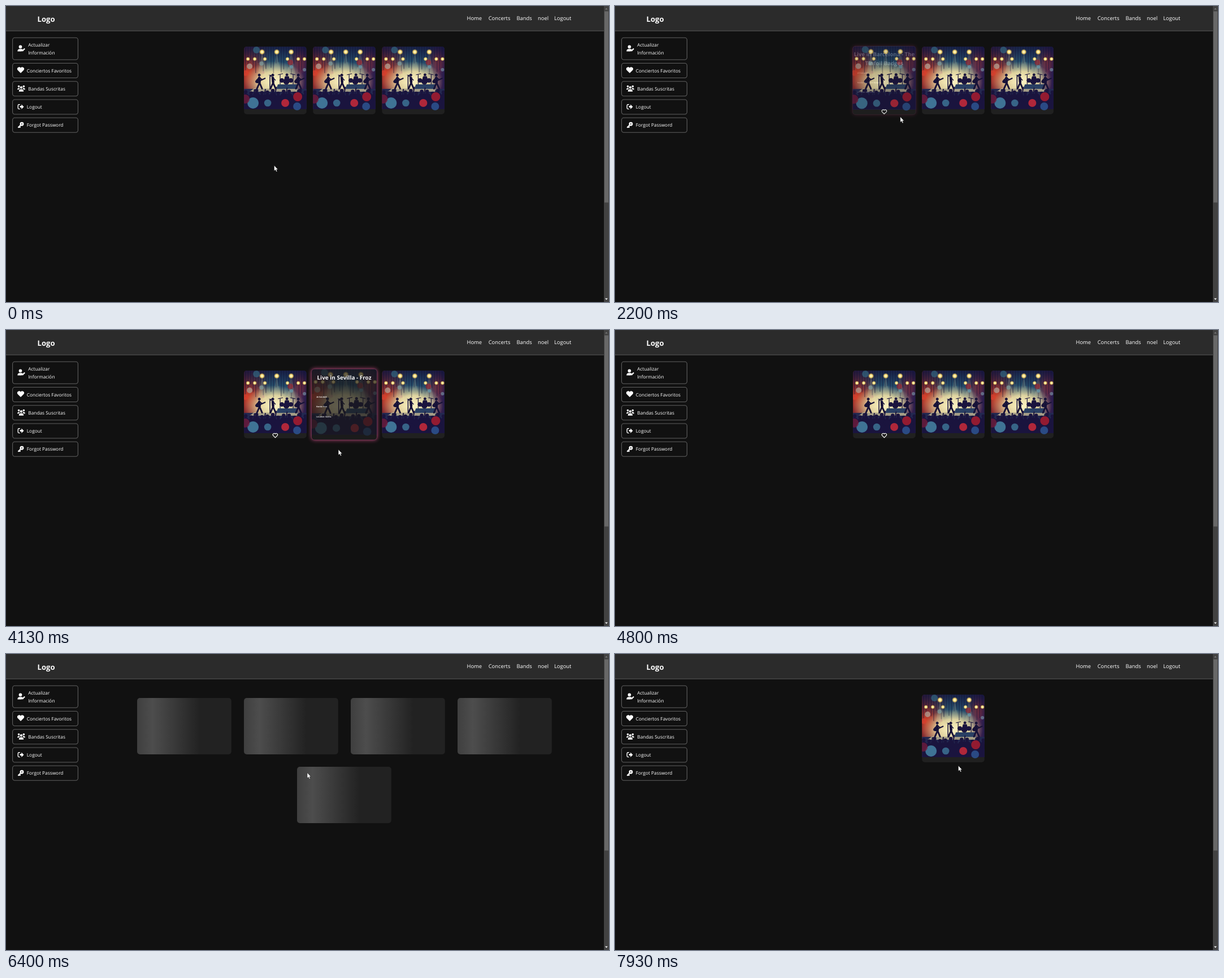
An HTML page that plays this animation: 1067 px wide and 525 px high, repeating every 8 s.

```html
<!DOCTYPE html>
<html lang="es">
<head>
<meta charset="utf-8">
<title>Concerts</title>
<style>
html, body { margin: 0; width: 100%; height: 100%; overflow: hidden; background: #111; }
svg { display: block; width: 1067px; height: 525px; fill: #fff; text-rendering: geometricPrecision;
  font-family: "Open Sans", "Noto Sans", sans-serif; }
.line { fill: none; stroke: #fff; }
.nav { font-size: 9.4px; font-weight: 500; }
.side { font-size: 8.32px; font-weight: 500; }
.title { font: bold 9.5px "Open Sans", sans-serif; text-anchor: middle; }
.info { font: bold 3.1px "Open Sans", sans-serif; }
</style>
</head>
<body>
<svg viewBox="0 0 1067 525">
  <defs>
    <filter id="blur" x="-20%" y="-20%" width="140%" height="140%"><feGaussianBlur stdDeviation="3.6"/></filter>
    <filter id="soft"><feGaussianBlur stdDeviation=".6"/></filter>
    <clipPath id="cardClip"><rect x="-55.3" y="-60" width="110.6" height="120" rx="5"/></clipPath>
    <linearGradient id="shine">
      <stop stop-color="#222"/><stop offset=".5" stop-color="#4d4d4d"/><stop offset="1" stop-color="#222"/>
    </linearGradient>
    <linearGradient id="sky">
      <stop stop-color="#6e2430"/><stop offset=".22" stop-color="#6a4a50"/><stop offset=".42" stop-color="#2f6a80"/>
      <stop offset=".7" stop-color="#285a78"/><stop offset=".9" stop-color="#4a2850"/><stop offset="1" stop-color="#241a4c"/>
    </linearGradient>
    <linearGradient id="shade" x2="0" y2="1">
      <stop stop-color="#14153c" stop-opacity=".85"/><stop offset=".5" stop-color="#14153c" stop-opacity="0"/>
    </linearGradient>
    <radialGradient id="glow">
      <stop stop-color="#fff6c8"/><stop offset=".5" stop-color="#f8e3a4" stop-opacity=".85"/>
      <stop offset="1" stop-color="#e0bc84" stop-opacity="0"/>
    </radialGradient>
    <radialGradient id="fire">
      <stop stop-color="#cc4028"/><stop offset="1" stop-color="#c03428" stop-opacity="0"/>
    </radialGradient>
    <radialGradient id="lamp">
      <stop stop-color="#fffbe0"/><stop offset=".5" stop-color="#ffe27a"/><stop offset="1" stop-color="#ffc94a" stop-opacity="0"/>
    </radialGradient>
    <g id="player" fill="#171238" stroke="#171238" stroke-linecap="round">
      <circle cy="-10.5" r="2"/>
      <path fill="none" stroke-width="4.6" d="M0-5.5L.5 2"/>
      <path fill="none" stroke-width="3" d="M.5 3L-4 13.5M.5 3L5 13.5"/>
    </g>
    <g id="guitarist">
      <use href="#player"/>
      <path d="M-2 1L11-5M0-6L-5-1M0-6L6-2" stroke="#171238" stroke-width="2"/>
      <ellipse cx="-2.5" cy="1" rx="4.6" ry="3" fill="#171238"/>
    </g>
    <g id="photo"></g>
    <path id="heart" d="M0 4.8L-4.6.2A2.8 2.8 0 0 1 0-3.4A2.8 2.8 0 0 1 4.6.2Z"/>
  </defs>

  <rect width="1067" height="525" fill="#111"/>
  <rect width="1058" height="44" fill="#2b2b2b"/>
  <rect y="43.6" width="1058" height="1.1" fill="#555"/>
  <text x="55.5" y="28" font-size="13.1" font-weight="bold">Logo</text>
  <g class="nav" id="userNav"></g>
  <g class="nav" id="guestNav"></g>
  <g class="side" id="side"></g>
  <g id="icons">
    <circle cx="25.5" cy="72.4" r="2.8"/>
    <path d="M20.4 80.5Q20.4 76.3 24.5 76.3H27Q29 76.3 30 77.3L27.8 80.5Z"/>
    <path class="line" stroke-width="2.1" d="M28.8 80L33.2 75.6"/>
    <use href="#heart" transform="translate(26 113.6) scale(1.15)"/>
    <circle cx="27" cy="144.4" r="2.2"/><circle cx="22.6" cy="142.6" r="1.8"/><circle cx="31.4" cy="142.6" r="1.8"/>
    <path d="M22.8 151.8Q22.8 147.6 27 147.6T31.2 151.8ZM20 148.3Q20 145.2 24 145.2V147L22.8 148.3ZM34 148.3Q34 145.2 30 145.2V147L31.2 148.3Z"/>
    <path class="line" stroke-width="1.4" d="M24.8 174.8H23Q21.3 174.8 21.3 176.4V181Q21.3 182.6 23 182.6H24.8"/>
    <path d="M24.6 177.3H27.3V174.4L31.6 178.7L27.3 183V180.1H24.6Z"/>
    <circle class="line" cx="28" cy="209.2" r="2.2" stroke-width="2.5"/>
    <path class="line" stroke-width="2.2" d="M26.4 210.8L21.4 215.8M22 214.8H24.6V213"/>
  </g>

  <g id="empty">
    <path d="M427 71L443.5 87M443.5 71L427 87" stroke="#f92f60" stroke-width="5" stroke-linecap="round"/>
    <text x="456" y="87" font-size="20.96" fill="#d81616">No hay conciertos programados.</text>
  </g>
  <g id="skeletons" fill="url(#shine)"></g>
  <g id="cards"></g>

  <rect x="1058" width="9" height="525" fill="#424242"/>
  <rect x="1059" y="9.5" width="7" height="339" fill="#686868"/>
  <path d="M1060 6.2L1062.4 3.6L1064.8 6.2Z" fill="#777"/>
  <path d="M1060 518.6L1062.4 521.2L1064.8 518.6Z"/>

  <g id="cursor" stroke="#111" stroke-width=".5">
    <path id="arrow" d="M-.5-.5V9.3L1.7 7.3L3.3 10.7L4.9 10L3.4 6.7H6.2Z"/>
    <path id="hand" d="M-1 1.2Q-1 0 0 0T1 1.2V4.6L4.6 5.6Q5.6 6 5.5 8L4.6 12.5H-.6L-3.6 8.6Q-4.2 7-2.6 7L-1 8.2Z"/>
  </g>
</svg>

<script>
const $ = id => document.getElementById(id);
const show = (id, on) => $(id).style.display = on ? "" : "none";
const text = (x, y, s, cls = "") => `<text x="${x}" y="${y}" class="${cls}">${s}</text>`;
const dot = (x, y, r, fill, alpha = 1) =>
  `<circle cx="${x}" cy="${y}" r="${r}" fill="${fill}" opacity="${alpha}"/>`;

// Concert picture, 110.6 units square
function photo() {
  const ink = "#1a143e";
  let s = `<rect width="110.6" height="110.6" fill="url(#sky)"/>
    <ellipse cx="8" cy="46" rx="28" ry="40" fill="url(#fire)"/>
    <ellipse cx="98" cy="24" rx="18" ry="26" fill="url(#fire)" opacity=".55"/>
    <rect width="110.6" height="80" fill="url(#shade)"/>
    <ellipse cx="54" cy="62" rx="54" ry="36" fill="url(#glow)"/>`;
  for (let x = 2; x < 110; x += 4.5)
    s += `<rect x="${x}" width="1.6" height="${36 + 12 * Math.sin(x)}" fill="#121338" opacity=".4"/>`;
  for (const x of [32, 58, 83.5])
    s += `<path d="M${x} 10L${x - 11} 66H${x + 11}Z" fill="#fff0b0" opacity=".14"/>` + dot(x, 9.5, 5.2, "url(#lamp)");
  for (const x of [7, 19, 37, 77, 96, 107]) s += dot(x, 22, 3.8, "url(#lamp)");
  s += dot(10, 35, 5, "#b5a294", .75) + dot(31, 30, 3.8, "#7fa0a0", .7) + dot(3, 47, 5, "#d8402f", .8)
    + dot(22, 6, 6, "#34748c", .6) + dot(84, 36, 3, "#6a9eb0", .7) + dot(82, 28, 5, "#a8242c", .6)
    + dot(107, 41, 3, "#7a9cae", .6) + dot(34, 46, 2.5, "#d8b094", .7);
  // stage and band
  s += `<path d="M0 75H111V111H0Z" fill="#232850"/><path d="M18 74H94L102 80H10Z" fill="#cfc598" opacity=".75"/>
    <path d="M60 67H95V75H57Z" fill="#2a4064"/>
    <use href="#guitarist" x="27" y="61"/><use href="#guitarist" x="96" y="61"/><use href="#player" x="51" y="61"/>
    <path d="M51 55L46 51L50 51M51 55L56 60M46 52V76" stroke="${ink}" fill="none" stroke-width="1.6"/>
    <g fill="${ink}" stroke="${ink}"><circle cx="76" cy="50" r="2"/><path d="M73 53H79L81 61H71Z"/>
    <circle cx="75" cy="62" r="5"/><circle cx="67" cy="60" r="3.6"/><circle cx="83" cy="60" r="3.6"/>
    <path d="M60 50L69 48M82 48L91 50M64 49V67M87 49V67" stroke-width="1.2"/></g>`;
  // audience
  s += `<path d="M0 87H111V111H0Z" fill="${ink}"/>`;
  for (let i = 0; i < 12; i++) {
    const x = 3 + i * 9.6, y = 80.5 + 2.5 * Math.sin(i * 2.3);
    s += dot(x, y, 3.2, ink) + `<ellipse cx="${x}" cy="${y + 9}" rx="6" ry="6.5" fill="${ink}"/>`;
    if (i % 2) s += `<path d="M${x + 4} ${y + 7}L${x + 6} ${y - 6}" stroke="${ink}" stroke-width="2" stroke-linecap="round"/>`;
  }
  return s + `<g filter="url(#soft)">` + dot(16, 100, 10, "#4584a4", .85) + dot(42, 100, 6.3, "#3c7294", .85)
    + dot(73, 100, 7, "#b8283a", .95) + dot(95, 89, 8, "#a01c30", .9) + dot(94, 106, 7, "#2d5390", .85)
    + dot(2, 93, 8, "#6e1c3c", .8) + `</g>`;
}
$("photo").innerHTML = photo();

const nav = items => items.map(([x, s]) => text(x, 25.4, s)).join("");
$("userNav").innerHTML = nav([[815.5, "Home"], [853.7, "Concerts"], [903.5, "Bands"], [941, "noel"], [970, "Logout"]]);
$("guestNav").innerHTML = nav([[845.5, "Home"], [883.7, "Concerts"], [933.3, "Bands"], [971.3, "Sign In"]]);

// top, height, text x beside its icon, lines
const menu = [
  [56.2, 39, 39.3, "Actualizar", "Información"],
  [101.5, 26, 36.8, "Conciertos Favoritos"],
  [133.8, 26, 39.3, "Bandas Suscritas"],
  [166, 26, 36.8, "Logout"],
  [198.2, 26, 36.8, "Forgot Password"]
];
$("side").innerHTML = menu.map(([y, h, x, ...lines]) =>
  `<rect x="11.6" y="${y}" width="115.8" height="${h}" rx="4" fill="none" stroke="#606060" stroke-width="1.1"/>` +
  lines.map((s, i) => `<text data-x="${x}" y="${y + 16.2 + i * 13.3}">${s}</text>`).join("")).join("");
const labels = [...$("side").querySelectorAll("text")];

$("skeletons").innerHTML = [[232, 78], [421, 78], [610, 78], [799, 78], [515, 200]].map(([x, y]) =>
  `<rect x="${x}" y="${y}" width="166.7" height="100" rx="5"/>`).join("");

const concerts = [
  { x: 476.4, title: ["Live in Barcelona - The", "Tinfoil Badges"],
    info: ["27 Feb 2025", "Banda: The Tinfoil Badges", "Location: Barcelona"] },
  { x: 598.5, title: ["Live in Sevilla - Froz"], info: ["28 Feb 2025", "Banda: Froz", "Location: Sevilla"] },
  { x: 720.7, title: [], info: [] }
];
const box = attrs => `<rect x="-55.3" y="-60" width="110.6" height="120" rx="5" ${attrs}/>`;
$("cards").innerHTML = concerts.map(c => `<g>
  ${box('class="halo" fill="#f0569a" filter="url(#blur)"')}${box('fill="#202020"')}
  <g clip-path="url(#cardClip)"><use href="#photo" x="-55.3" y="-60"/></g>
  <use class="like line" href="#heart" transform="translate(0 55) scale(.8)" stroke-width="1.4"/>
  <g class="over">${box('fill="#1a1a1a" fill-opacity=".7" stroke="#a04470" stroke-width=".5"')}
    ${c.title.map((s, i) => text(0, -42.4 + i * 15.3, s, "title")).join("")}
    ${c.info.map((s, i) => text(-47, -11.5 + i * 16.7, s, "info")).join("")}</g></g>`).join("");
const cards = [...$("cards").children];

// CSS "ease" curve
function ease(x) {
  if (x <= 0 || x >= 1) return x <= 0 ? 0 : 1;
  let lo = 0, hi = 1;
  for (let i = 0; i < 20; i++) {
    const s = (lo + hi) / 2, r = 1 - s;
    if (.75 * s * r * r + .75 * s * s * r + s * s * s < x) lo = s; else hi = s;
  }
  const r = 1 - lo;
  return .3 * lo * r * r + 3 * lo * lo * r + lo * lo * lo;
}

// time, x, y
const path = [
  [0, 475, 283.3], [40, 475, 283.3], [330, 486, 208.5], [620, 486, 208.5], [870, 481, 188], [1330, 475.5, 189.5],
  [1840, 475.5, 189.5], [2070, 488, 197], [2400, 532, 197], [2640, 532, 197], [2867, 592, 191.5], [3130, 592, 190],
  [4070, 592, 190], [4133, 588.7, 212.5], [4270, 562, 238], [4400, 500, 245], [4733, 150, 8], [4795, 150, -30],
  [5800, 113.7, -30], [5866, 113.7, 27.5], [6066, 533.5, 211], [7370, 533.5, 211], [7930, 608, 198.5]
];
function pointer(t) {
  const i = path.findIndex(p => p[0] > t);
  if (i < 0) return path.at(-1).slice(1);
  const [t0, x0, y0] = path[i - 1], [t1, x1, y1] = path[i], k = (t - t0) / (t1 - t0);
  return [x0 + (x1 - x0) * k, y0 + (y1 - y0) * k];
}

const hovers = [[800, 2060], [2840, 4120], [9e3, 9e3]];
const LOGOUT = 5860, ICONS = 5925, LOADING = 5990, SHINE = 6141, LOGIN = 6260, READY = 7525;

function draw(t) {
  const guest = t >= LOGOUT && t < LOGIN, icons = t < LOGOUT || t >= ICONS;
  show("userNav", !guest);
  show("guestNav", guest);
  show("icons", icons);
  for (const l of labels) l.setAttribute("x", icons ? l.dataset.x : 34.3);
  show("empty", t >= LOGOUT && t < LOADING);
  show("skeletons", t >= LOADING && t < READY);

  const sweep = 2 * ease(Math.max(0, t - SHINE) % 1200 / 1200) - 1;
  $("shine").setAttribute("x1", sweep);
  $("shine").setAttribute("x2", sweep + 1);

  cards.forEach((g, i) => {
    const [on, off] = hovers[i], h = ease((t - on) / 300) - ease((t - off) / 300);
    g.style.display = t < LOGOUT || (t >= READY && i === 1) ? "" : "none";
    g.setAttribute("transform", `translate(${concerts[i].x} 132) scale(${1 + .05 * h})`);
    g.querySelector(".halo").setAttribute("opacity", .8 * h);
    g.querySelector(".over").setAttribute("opacity", h);
    g.querySelector(".like").setAttribute("opacity", i === 0 && t > 1990 ? 1 : 0);
  });

  const hand = hovers.some(([on, off]) => t >= on && t < off);
  show("hand", hand);
  show("arrow", !hand);
  $("cursor").setAttribute("transform", `translate(${pointer(t)})`);
}

// The screen updates 15 times a second
const STEP = 1000 / 15, start = performance.now();
function tick() {
  const t = (performance.now() - start) % 8000;
  draw(Math.floor((t + 5) / STEP) % 120 * STEP);
  requestAnimationFrame(tick);
}
tick();
</script>
</body>
</html>
```
